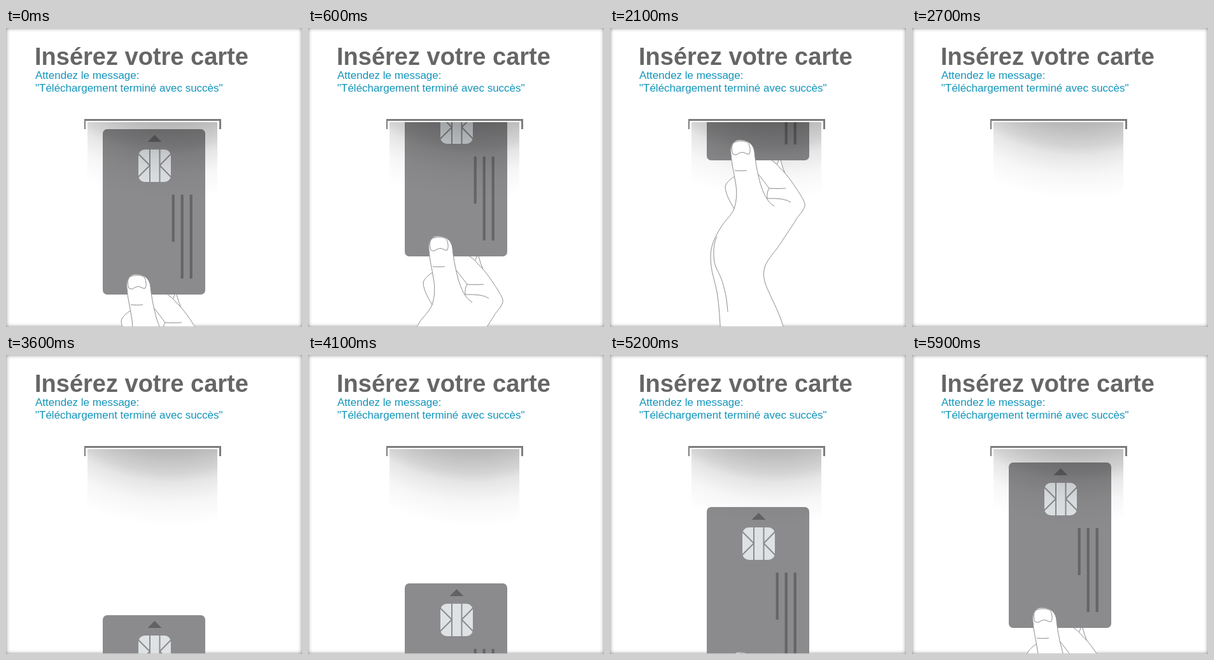
These frames come from a looping animation (465x470 px, 6 s). An HTML page:

```html
<!DOCTYPE html>
<html lang="fr">
<head>
<meta charset="utf-8">
<title>Insérez votre carte</title>
<style>
  html, body { margin: 0; width: 100%; height: 100%; overflow: hidden; background: #fff; }
  svg { position: absolute; left: 0; top: 0; }
  .frame { position: absolute; inset: 0; box-shadow: inset 0 0 6px rgba(0, 0, 0, .5); }
  text { font-family: "Liberation Sans", Arial, sans-serif; font-size: 17px; fill: #1295bb; }
  .title { font-size: 38px; font-weight: bold; fill: #666; }
  .hand path { fill: none; stroke: #8c8c8c; stroke-width: 1; stroke-linejoin: round; }
  .hand .skin { fill: #fff; }
</style>
</head>
<body>
<div class="frame"></div>
<svg width="465" height="470" viewBox="0 0 465 470">
  <defs>
    <radialGradient id="dark" gradientUnits="userSpaceOnUse" cx="260" cy="-60" r="330">
      <stop offset=".63" stop-opacity=".29"/>
      <stop offset=".745" stop-opacity=".17"/>
      <stop offset=".79" stop-opacity=".1"/>
      <stop offset=".88" stop-opacity=".035"/>
      <stop offset="1" stop-opacity="0"/>
    </radialGradient>
    <rect id="shade" x="128" y="148" width="204" height="122" fill="url(#dark)"/>
    <clipPath id="slot"><rect y="148" width="465" height="321"/></clipPath>
    <clipPath id="reach"><rect y="143" width="465" height="326"/></clipPath>
    <clipPath id="face"><rect class="move" x="152" y="159" width="161" height="260" rx="7"/></clipPath>
  </defs>

  <text class="title" x="45" y="58">Insérez votre carte</text>
  <text x="46" y="80">Attendez le message:</text>
  <text x="46" y="100">"Téléchargement terminé avec succès"</text>

  <path d="M123 143H338V159H335V146H125V159H123Z" fill="#7b7d7b"/>
  <use href="#shade"/>

  <!-- palm and fingers behind the card -->
  <g clip-path="url(#reach)"><g class="move"><g class="hand" transform="translate(0 211)">
    <path class="skin" d="M268 200V208Q271 220 276 231L284 243L262 216Z"/>
    <path class="skin" d="M196 233C188 238 181 245 181 250C182 262 188 272 195 284
      C190 296 181 302 175 312C165 328 158 342 158 360C158 382 165 398 168 415C172 440 172 455 174 480L177 560
      H306C298 520 285 500 272 469C266 448 257 432 250 416C243 402 240 390 242 381C243 368 258 353 265 343L292 302
      C294 296 303 290 306 280C307 274 302 268 299 262C290 248 279 231 268 221Q262 213 254 208L245 200H205Z"/>
    <path d="M168 328C161 340 162 365 166 375C173 390 176 395 179 408C183 422 184 434 185 446"/>
    <path d="M233 230Q242 241 250 252Q263 253 276 252M250 252Q246 258 247 268Q275 267 284 274"/>
  </g></g></g>

  <g clip-path="url(#slot)"><g clip-path="url(#face)">
    <g class="move">
      <rect x="152" y="159" width="161" height="260" fill="#8b8b8d"/>
      <path d="M233.5 168L244.5 179H222.5Z" fill="#626264"/>
      <rect x="208" y="191" width="51" height="51" rx="10" fill="#dee2e5"/>
      <path d="M226 191V242M241.500 191V242M207 197L226 216L207 235M260 197L241.500 216L260 235"
        fill="none" stroke="#8b8b8d" stroke-width="2"/>
      <path d="M262.700 262V336M276.700 262V394M290.700 262V394" stroke="#656567" stroke-width="4.200"/>
    </g>
    <use href="#shade"/>
  </g></g>

  <!-- thumb in front of the card -->
  <g clip-path="url(#reach)"><g class="move"><g class="hand" transform="translate(0 211)">
    <path class="skin" d="M195 284C199 272 200 258 197 242C195 228 191 214 190 198
      C188 184 194 176 204 176C217 176 226 183 227 196C229 216 233 232 236 244C241 260 247 274 258 280"/>
    <path d="M193 198C190 190 191 181 197 179C205 177 215 177 218 182C220 187 221 193 219 198
      M193 198Q196 200 199 199Q207 193 213 197Q216 199 219 198M196 224Q205 225 215 224"/>
  </g></g></g>
</svg>
<script>
  const STEP = 100, LOOP = 6000, HIDDEN = 400;
  const parts = document.querySelectorAll('.move');

  // Vertical distance of card and hand from their place at the slot.
  function offset(k) {
    if (k < 27) return -Math.round(10.05 * k);
    if (k < 32) return HIDDEN;
    if (k <= 45) return 610 - 10 * k;
    if (k <= 52) return Math.round(160 - 80 * (k - 45) / 7);
    return 600 - 10 * k;
  }

  function draw() {
    const y = offset(Math.floor(performance.now() % LOOP / STEP));
    for (const part of parts) part.setAttribute('transform', `translate(0 ${y})`);
    requestAnimationFrame(draw);
  }
  draw();
</script>
</body>
</html>
```
